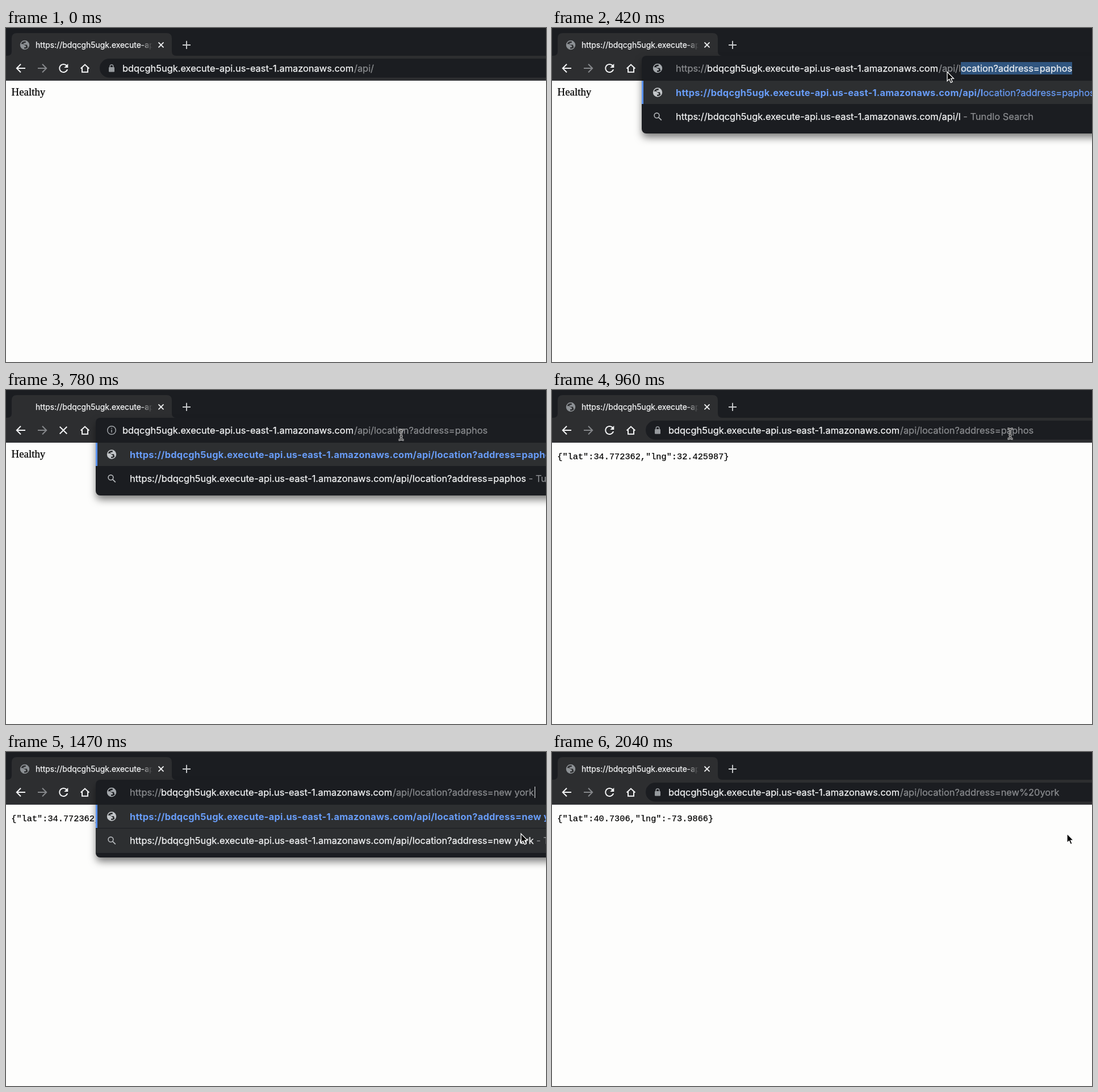
An HTML page for the animation above (2070 ms loop, 951 px wide and 589 px high).

```html
<!DOCTYPE html>
<html lang="en">
<head>
<meta charset="utf-8">
<title>API in a browser</title>
<style>
  html, body { margin: 0; width: 100%; height: 100%; overflow: hidden; background: #fdfdfc; }
  #stage { position: relative; width: 951px; height: 589px; overflow: hidden;
    font: 16.4px/20px Inter, Roboto, sans-serif; color: #f4f5f6; -webkit-text-stroke: .25px currentColor; }
  #stage * { white-space: pre; }
  #stage > *, #popup > *, #bar > * { position: absolute; }
  svg { left: 0; top: 0; overflow: visible; }
  .page { color: #000; }
  #hello { left: 9.5px; top: 103px; font: 18.9px/20px "Liberation Serif", "Times New Roman", serif; }
  #json { left: 9.3px; top: 108px; font: 15.28px/20px "Liberation Mono", "Courier New", monospace; }
  #tab { left: 52px; top: 19.5px; width: 206px; overflow: hidden; font-size: 13.9px;
    -webkit-mask-image: linear-gradient(90deg, #000 184px, transparent 206px);
    mask-image: linear-gradient(90deg, #000 184px, transparent 206px); }
  #popup { left: 158px; top: 49px; width: 830px; height: 137px; border-radius: 8px;
    background: #1b1d21; box-shadow: 0 8px 14px -1px rgba(0, 0, 0, .52); }
  .row { left: 0; width: 100%; }
  #row1 { top: 44px; height: 41px; background: #2d2f31; box-shadow: inset 3px 0 #5a92f5; }
  #row2 { top: 86px; height: 43px; }
  .row.hover { background: #2d2f31; }
  .line { left: 60px; }
  #line1 { top: 54.5px; color: #689cf7; }
  #line1 b { font-weight: 700; letter-spacing: .24px; -webkit-text-stroke: 0; }
  #line2 { top: 97px; }
  .dim { color: #8b8d90; }
  #bar { left: 0; top: 61px; }
  #bar > * { top: 0; }
  #bar .sel { background: #30557f; color: #eef1f4; padding: 1px 0; }
  #caret { display: inline-block; width: 1px; height: 20px; margin-left: 1px; background: #e8eaed; vertical-align: top; }
</style>
</head>
<body>
<div id="stage">
  <div id="hello" class="page">Healthy</div>
  <div id="json" class="page"></div>

  <svg width="951" height="589" fill="none">
    <defs>
      <g id="globe">
        <circle r="7.4" fill="none" stroke="currentColor" stroke-width="1.6"/>
        <path fill="currentColor" d="M-7.4-1.8H-3Q0-1.8 0 1H2V4H-1V7.4Q-8 6-7.4-1.8zM2-7.3V-5.2Q2-3.5 0-3.5H-2V-.6H3.5Q4.6-.6 4.6 3H7Q9-4.500 2-7.300z"/>
      </g>
      <path id="back" d="M8 0H-7M0-7.3L-7.2 0L0 7.3" stroke-width="2"/>
    </defs>
    <path fill="#1b1d21" d="M0 0H951V50H0z"/>
    <path fill="#2d2e30" d="M0 49H2Q10 49 10 41V18Q10 9 19 9H283Q292 9 292 18V41Q292 49 300 49H951V93H0z"/>
    <path fill="#414245" d="M0 92H951V93H0z"/>
    <rect id="pill" x="165" y="54" width="830" height="33.5" rx="16.7" fill="#1b1d21" stroke-width="2"/>
    <use id="favicon" href="#globe" transform="translate(33 30)" color="#8d9195"/>
    <circle id="spinner" cx="33" cy="30" r="8" stroke="#8b9096" stroke-width="2"/>
    <path d="M268.5 25.3l9 9m0-9l-9 9" stroke="#f1f2f3" stroke-width="1.8"/>
    <path d="M318 22.8V37M311 30H325" stroke="#c9cbcd" stroke-width="1.9"/>
    <use href="#back" transform="translate(26 71)" stroke="#f3f4f5"/>
    <use href="#back" transform="translate(64 71) scale(-1 1)" stroke="#85878a"/>
    <path id="reload" transform="translate(89.3 59)" fill="#f3f4f5" d="M17.65 6.35C16.2 4.9 14.21 4 12 4c-4.42 0-7.99 3.58-7.99 8s3.57 8 7.99 8c3.73 0 6.84-2.55 7.73-6h-2.08c-.82 2.33-3.04 4-5.65 4-3.31 0-6-2.69-6-6s2.69-6 6-6c1.66 0 3.14.69 4.22 1.78L13 11h7V4l-2.35 2.35z"/>
    <path id="stop" d="M94.7 64.7l12.6 12.6m0-12.6l-12.6 12.6" stroke="#f3f4f5" stroke-width="2"/>
    <path d="M131.6 71.4L139 64.6L146.4 71.4M134 70V77.8H144V70" stroke="#f3f4f5" stroke-width="2"/>
  </svg>
  <div id="tab">https://bdqcgh5ugk.execute-api</div>

  <div id="popup">
    <div id="row1" class="row"></div>
    <div id="row2" class="row"></div>
    <svg width="830" height="137" fill="none">
      <use href="#globe" transform="translate(28 64.5)" color="#c3c6c9"/>
      <circle cx="26.5" cy="105.3" r="4.4" stroke="#b4b7ba" stroke-width="1.6"/>
      <path d="M29.8 108.6l5 5" stroke="#b4b7ba" stroke-width="1.9"/>
    </svg>
    <div id="line1" class="line"><b></b><span></span></div>
    <div id="line2" class="line"><span></span><span class="dim"> - Tundlo Search</span></div>
  </div>

  <svg width="951" height="589" fill="none">
    <g id="lock"><rect x="181" y="69" width="10" height="8.4" rx="1.2" fill="#969a9e"/>
      <path d="M183.2 70V67.5a2.8 2.8 0 0 1 5.6 0V70" stroke="#969a9e" stroke-width="1.5"/></g>
    <use id="site" href="#globe" transform="translate(186 71)" color="#a4a8ac"/>
    <g id="info" stroke="#a0a4a8" stroke-width="1.5"><circle cx="186" cy="71" r="7.3"/>
      <path d="M186 70V75M186 66.8V68.5"/></g>
  </svg>
  <div id="bar">
    <span id="scheme" class="dim">https://</span>
    <span id="host">bdqcgh5ugk.execute-api.us-east-1.amazonaws.com</span>
    <span id="path" class="dim"><span id="typed"></span><span id="rest" class="sel"></span><span id="caret"></span></span>
  </div>

  <svg width="951" height="589" fill="none">
    <defs>
      <path id="ibar" d="M-4.5-9Q-1-9 0-7Q1-9 4.5-9M0-7V7M-4.5 9Q-1 9 0 7Q1 9 4.5 9M-2.5 3H2.5"/>
    </defs>
    <path id="pointer" d="M0 0V16.2L3.7 12.8L6.3 18.8L9.1 17.6L6.6 11.8H11.4z" fill="#000" stroke="#fff" stroke-width="1.3"/>
    <g id="beam">
      <use href="#ibar" stroke="#fff" stroke-width="3"/>
      <use href="#ibar" stroke="#111" stroke-width="1.2"/>
    </g>
  </svg>
</div>
<script>
const LOOP = 2070, TICK = 30;
const BASE = 'https://bdqcgh5ugk.execute-api.us-east-1.amazonaws.com';
const FIND = '/api/location?address=';
const PAGES = ['', '{"lat":34.772362,"lng":32.425987}', '{"lat":40.7306,"lng":-73.9866}'];
const $ = id => document.getElementById(id);
const show = (id, on) => { $(id).style.display = on ? '' : 'none'; };

// Each step overrides part of the state from its time on.
const steps = [
  [0, { page: 0, path: '/api/', rest: '', edit: 0, all: 0, caret: 0, pop: 0, load: 0 }],
  [150, { edit: 1, all: 1 }],
  [240, { all: 0, caret: 1 }],
  [330, { pop: 1, path: '/api/l', rest: 'ocation?address=paphos', caret: 0 }],
  [570, { path: FIND + 'paphos', rest: '', caret: 1 }],
  [780, { edit: 0, caret: 0, load: 780 }],
  [810, { pop: .4 }],
  [840, { pop: 0 }],
  [930, { page: 1, load: 0 }],
  [1020, { edit: 1, path: FIND, rest: 'paphos' }],
  [1110, { pop: 1, path: FIND + 'n', rest: '', caret: 1 }],
  [1140, { path: FIND + 'ne' }],
  [1170, { path: FIND + 'new' }],
  ...[...' york'].map((c, i) => [1290 + i * 45, { path: FIND + 'new york'.slice(0, 4 + i) }]),
  [1590, { edit: 0, caret: 0, load: 1590, path: FIND + 'new%20york' }],
  [1620, { pop: .4 }],
  [1650, { pop: 0 }],
  [1740, { page: 2, load: 0 }]
];

// time, x, y, text cursor?
const track = [
  [30, 740, 150, 0], [90, 700, 86, 1], [120, 696, 79, 1], [330, 696, 77, 0],
  [690, 696, 79, 1], [780, 696, 79, 1], [960, 807, 77, 1], [1020, 815, 72, 1],
  [1110, 815, 72, 0], [1200, 907, 144, 0], [LOOP, 907, 144, 0]
];

function stateAt(t) {
  const s = {};
  for (const [at, change] of steps) {
    if (at > t) break;
    Object.assign(s, change);
    if (s.edit) { s.query = s.path; s.guess = s.rest; }
  }
  return s;
}

function cursorAt(t) {
  const i = track.findIndex(p => p[0] > t);
  if (i < 1) return null;
  const a = track[i - 1], b = track[i];
  const k = (t - a[0]) / (b[0] - a[0]), e = k * k * (3 - 2 * k);
  return { x: a[1] + (b[1] - a[1]) * e, y: a[2] + (b[2] - a[2]) * e, beam: a[3] };
}

function drawBar(s) {
  const left = s.edit && s.pop ? 218 : 205;
  const host = left + (s.edit ? 55 : 0);
  show('scheme', s.edit);
  $('scheme').style.left = left + 'px';
  $('host').style.left = host + 'px';
  $('path').style.left = host + 408 + 'px';
  $('typed').textContent = s.path;
  $('rest').textContent = s.rest;
  for (const id of ['scheme', 'host', 'typed']) $(id).classList.toggle('sel', !!s.all);
  show('caret', s.caret);
  $('pill').setAttribute('stroke', s.edit && !s.pop ? '#7ba7ee' : 'none');
  show('lock', !s.load && !(s.edit && s.pop));
  show('site', s.edit && s.pop);
  show('info', s.load);
}

function drawPopup(s, cursor) {
  $('popup').style.opacity = s.pop;
  if (!s.pop) return;
  const [bold, plain] = $('line1').children;
  bold.textContent = BASE + s.query;
  plain.textContent = s.guess;
  $('line2').firstChild.textContent = BASE + s.query;
  $('row2').classList.toggle('hover', !!cursor && cursor.y > 134 && cursor.y < 178);
}

function drawLoading(s, t) {
  show('favicon', !s.load);
  show('reload', !s.load);
  show('stop', s.load);
  show('spinner', s.load && t > s.load);
  const age = t - s.load, arc = Math.min(age / 8, 16);
  $('spinner').setAttribute('stroke-dasharray', arc + ' 60');
  $('spinner').setAttribute('transform', `rotate(${-70 - age * 1.2} 33 30)`);
}

function drawCursor(c) {
  show('pointer', c && !c.beam);
  show('beam', c && c.beam);
  if (c) $(c.beam ? 'beam' : 'pointer').setAttribute('transform', `translate(${c.x} ${c.y})`);
}

function frame(now) {
  const t = Math.floor(now % LOOP / TICK) * TICK;
  const s = stateAt(t), cursor = cursorAt(t);
  show('hello', !s.page);
  $('json').textContent = PAGES[s.page];
  drawBar(s);
  drawPopup(s, cursor);
  drawLoading(s, t);
  drawCursor(cursor);
}

const start = performance.now();
function run() {
  frame(performance.now() - start);
  requestAnimationFrame(run);
}
run();
</script>
</body>
</html>
```
